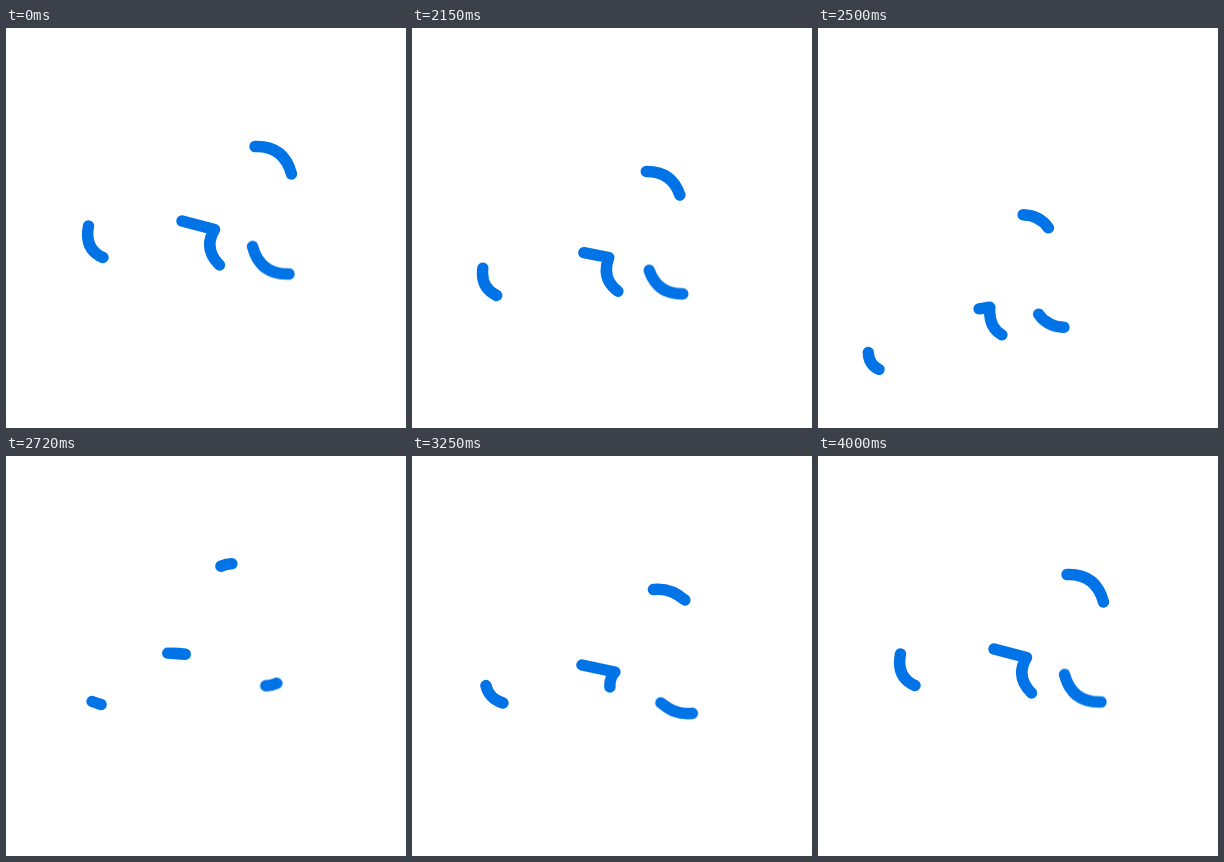
An HTML page without scripts for the animation above (4.02 s loop, 400 by 400 pixels).

```html
<!DOCTYPE html>
<html lang="en">
<head>
<meta charset="utf-8">
<title>Swinging strokes</title>
<style>
html, body { margin: 0; width: 100%; height: 100%; overflow: hidden; background: #fff; }
svg { display: block; width: 100%; height: 100%; }
path { fill: none; stroke: #0073e6; stroke-width: 11.4; stroke-linecap: round; stroke-linejoin: round; }
path, .mirror { animation: 4.02s infinite; }
.arc { animation-name: arc; }
.mirror { animation-name: mirror; }
.left { animation-name: left; }
.hook { animation-name: hook; }

/* Each swing speeds up towards the middle and slows at its far point. */
@keyframes arc {
  0%, 49.75%, 99.5%, 100% { d: path("M249 118.5Q278 117.5 285.5 146"); animation-timing-function: ease-in; }
  55.97% { d: path("M215 176Q236 176.5 245 194.5"); animation-timing-function: ease-out; }
  60.2% { d: path("M204 196Q222 197 231 211"); animation-timing-function: ease-in; }
  67.66% { d: path("M214.5 110Q220 107.5 225.5 107.5"); animation-timing-function: ease-out; }
  74.13% { d: path("M257 148Q268.5 143 280 147"); animation-timing-function: ease-in; }
  80.85% { d: path("M241.5 133.5Q258.5 131.5 273 144"); animation-timing-function: ease-out; }
  85.82% { d: path("M222 129Q244 125 257 142"); animation-timing-function: ease-in; }
  89.55% { d: path("M224 124Q249 118.5 262 140"); animation-timing-function: ease-in-out; }
}
/* The lower arc is the upper one turned half round. */
@keyframes mirror {
  0%, 49.75%, 99.5%, 100% { transform: translate(532px, 364.5px); animation-timing-function: ease-in; }
  55.97% { transform: translate(470px, 468px); animation-timing-function: ease-out; }
  60.2% { transform: translate(447px, 504px); animation-timing-function: ease-in; }
  67.66% { transform: translate(485px, 337px); animation-timing-function: ease-out; }
  74.13% { transform: translate(580px, 413px); animation-timing-function: ease-in; }
  80.85% { transform: translate(522px, 391px); animation-timing-function: ease-out; }
  85.82% { transform: translate(493px, 376px); animation-timing-function: ease-in; }
  89.55% { transform: translate(499px, 368.5px); animation-timing-function: ease-in-out; }
}
@keyframes left {
  0%, 49.75%, 99.5%, 100% { d: path("M82.5 198Q78 221 97 229.5"); animation-timing-function: ease-in; }
  55.97% { d: path("M55.5 295Q56 310.5 68.5 317"); animation-timing-function: ease-out; }
  60.2% { d: path("M46 334Q46 347.5 57 352.5"); animation-timing-function: ease-in; }
  67.66% { d: path("M86 245.5Q90 247 95 248.5"); animation-timing-function: ease-out; }
  74.13% { d: path("M95 250Q100 255 106 258"); animation-timing-function: ease-in; }
  80.85% { d: path("M74 229.5Q77 242.5 91 247"); animation-timing-function: ease-out; }
  85.82% { d: path("M63.5 227Q66.5 243 82 248"); animation-timing-function: ease-in; }
  89.55% { d: path("M68.5 229.5Q70.5 248 88.5 254"); animation-timing-function: ease-in-out; }
}
@keyframes hook {
  0%, 49.75%, 99.5%, 100% { d: path("M176 193L208.5 201.5Q197 221 213.5 237"); animation-timing-function: ease-in; }
  55.97% { d: path("M166.5 266L181.5 266Q178.5 289.5 196 297.5"); animation-timing-function: ease-out; }
  60.2% { d: path("M161 291L171 289Q170 311 186 320"); animation-timing-function: ease-in; }
  67.66% { d: path("M161.5 197L179 198Q172 197 166 197"); animation-timing-function: ease-out; }
  74.13% { d: path("M190 222L217 226Q212 227.5 207 229"); animation-timing-function: ease-in; }
  80.85% { d: path("M170 209L203 216Q197.5 222 198 231"); animation-timing-function: ease-out; }
  85.82% { d: path("M158 209L191 214Q180 228 190 238"); animation-timing-function: ease-in; }
  89.55% { d: path("M162 207L195 211Q186.5 227 199 240"); animation-timing-function: ease-in-out; }
}
</style>
</head>
<body>
<svg viewBox="0 0 400 400">
  <path class="arc"/>
  <g class="mirror"><g transform="rotate(180)"><path class="arc"/></g></g>
  <path class="left"/>
  <path class="hook"/>
</svg>
</body>
</html>
```
